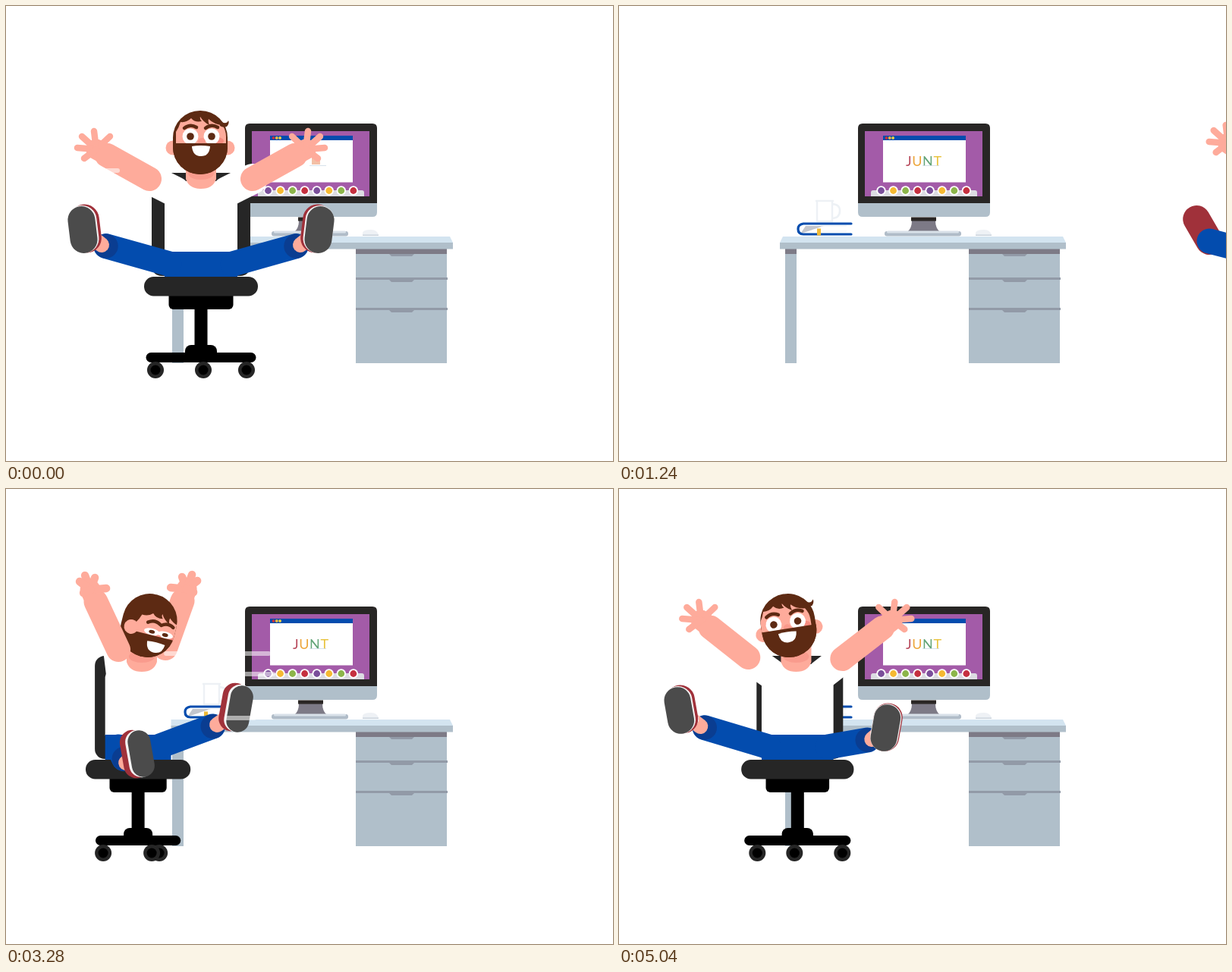
An HTML page for the animation above (5080 ms loop, 800 by 600 pixels).

```html
<!DOCTYPE html>
<html lang="en">
<head>
<meta charset="utf-8">
<title>Office chair spin</title>
<style>
html, body { margin: 0; width: 100%; height: 100%; overflow: hidden; background: #fff; }
svg { display: block; width: 100vw; height: 100vh; }
</style>
</head>
<body>
<svg viewBox="0 0 800 600">
  <g id="desk"></g>
  <g id="man"></g>
</svg>
<script>
const LOOP = 5080, STEP = 40, SPEED = 0.5425, SPIN = 0.45;
const SKIN = '#feab9b', HAIR = '#5d2a13', BLUE = '#034cae', NAVY = '#0a3d91', RED = '#a0313a',
  DARK = '#262626', STEEL = '#b0bfca', GREY = '#7d7a86', EDGE = '#929aa7';
const deskEl = document.getElementById('desk'), manEl = document.getElementById('man');

// ---- shape helpers ----
const rect = (x, y, w, h, fill, r = 0) =>
  `<rect x="${x}" y="${y}" width="${Math.max(0, w)}" height="${h}" rx="${r}" fill="${fill}"/>`;
const dot = (x, y, r, fill) => `<circle cx="${x}" cy="${y}" r="${r}" fill="${fill}"/>`;
const oval = (x, y, rx, ry, fill) => `<ellipse cx="${x}" cy="${y}" rx="${rx}" ry="${ry}" fill="${fill}"/>`;
const path = (d, fill, more = '') => `<path d="${d}" fill="${fill}" ${more}/>`;
const bar = (a, b, w, color, more = '') =>
  `<path d="M${a[0]} ${a[1]}L${b[0]} ${b[1]}" stroke="${color}" stroke-width="${w}" stroke-linecap="round" ${more}/>`;
const mix = (a, b, k) => a + (b - a) * k;
const mixPt = (a, b, k) => [mix(a[0], b[0], k), mix(a[1], b[1], k)];
const clamp = v => Math.min(1, Math.max(0, v));

// ---- pose curves: seven values for headings -54..54 degrees, 18 apart ----
const wrap = a => ((a + 180) % 360 + 360) % 360 - 180;
function front(v, a) {
  const p = Math.min(6, Math.max(0, a / 18 + 3)), i = Math.min(5, Math.floor(p));
  return mix(v[i], v[i + 1], p - i);
}
// a point that turns with the body: half a turn mirrors it
function swing(v, a) {
  a = wrap(a);
  const m = Math.abs(a), s = Math.sign(a);
  if (m <= 54) return front(v, a);
  if (m >= 126) return -front(v, wrap(a - 180));
  return mix(front(v, 54 * s), -front(v, -54 * s), (m - 54) / 72);
}
// a value that settles to one level behind
function settle(v, back, a) {
  a = wrap(a);
  return mix(front(v, a), back, clamp((Math.abs(a) - 54) / 72));
}

const FOOT_X = [134, 150, 156, 156, 116, 11, -4], FOOT_Y = [290, 296, 292, 295, 315, 319, 349];
const ANK_X = [-30, -27, -28, -25, -18, 7, 20], ANK_Y = [21, 18, 21, 20, 15, 14, 12];
const HIP_X = [26, 30, 38, 42, 40, 24, 26];
const SOLE_W = [31, 30, 36, 37, 36, 27, 31], SOLE_A = [10, 9, 10, 7, 10, 2, 10], SHOE = [-9, -9, -4, -4, 1, 3, 9];
const HAND_X = [64, 97, 127, 138, 125, 103, 63], HAND_Y = [132, 151, 173, 189, 173, 146, 133];
const CAP_X = [36, 42, 65, 68, 59, 49, 26], CAP_Y = [210, 216, 222, 228, 224, 213, 212];
const SHOULDER = [26, 30, 33, 34, 32, 30, 22];
const BACK_X = [-34, -36, 54, 65, 60, 73, 57], WHEEL = [28, 35, 53, 60, 59, 48, 46], MID = [18, 15, 4, 3, -4, -15, -18];
const EAR = [20, 28, 35, 36, 35, 26, 22];
const OPEN = [[-18, -17], [3, -24], [19, -17], [25, -2], [16, 12]];
const CURL = [[-21, -2], [-6, -16], [7, -19], [14, -11], [9, 4]];

function drawDesk(textOn) {
  let s = rect(219, 320, 15, 151, STEEL) + rect(219, 320, 15, 7, GREY) +
    rect(461, 320, 120, 151, STEEL) + rect(461, 320, 120, 7, GREY);
  for (const y of [358, 398]) s += rect(461, y, 121, 3, EDGE);
  for (const y of [327, 361, 401]) s += path(`M505 ${y}h33l-3 3h-27z`, EDGE);
  s += path('M216 304H585L589 312H212Z', '#d3e4f0') + rect(212, 312, 377, 8.5, STEEL);
  // monitor
  s += path('M315 259H489V272Q489 278 483 278H321Q315 278 315 272Z', STEEL) +
    path('M315 260V161Q315 155 321 155H483Q489 155 489 161V260Z', '#282625') +
    rect(324, 165, 155, 86, '#a35ba8') + rect(348, 171, 109, 61.5, '#fff') + rect(348, 171, 109, 6, BLUE);
  ['#c5303f', '#f5b942', '#f0d040'].forEach((c, i) => s += dot(352.5 + i * 4.3, 174, 1.9, c));
  s += path('M332 251V246Q332 243 335 243H469Q472 243 472 246V251Z', '#dcdce2');
  const icons = ['#7a4f9a', '#f5b932', '#8cb54a', '#c5303f'];
  for (let i = 0; i < 8; i++) {
    const x = 345.5 + i * 16.05;
    s += dot(x, 243.5, 6.2, '#fff') + dot(x, 243.5, 4.4, icons[i % 4]);
  }
  if (textOn) {
    const ink = ['#b84a5c', '#eda63a', '#62a477', '#e8c23c'];
    s += '<text x="378" y="210.5" font-family="Lato, sans-serif" font-size="18" letter-spacing="0.6">' +
      [...'JUNT'].map((c, i) => `<tspan fill="${ink[i]}">${c}</tspan>`).join('') + '</text>';
  } else s += rect(403, 199, 11, 10, '#f3c0a6');
  s += rect(400, 210, 22, 0.8, '#cfdbe6');
  s += path('M386 283H417Q417 293 423 298H380Q386 293 386 283Z', GREY) + rect(385, 278.5, 33, 5, '#2a2624') +
    rect(350, 297, 101, 6.5, '#b0bcc8', 3) + rect(353, 296.5, 95, 3, '#d9e1e9', 1.5) +
    path('M470 303V299Q471 295 481 295Q490 295 491 303Z', '#eef1f5') + rect(470, 301.5, 21, 1.5, '#cbd4dd');
  // mug and book
  s += path('M259 257H283M261 257V284H281V257M280 261Q291 261 291 270Q291 280 280 280', 'none',
    'stroke="#edf1f5" stroke-width="2.5"');
  s += path('M240 299L246 290H270L243 299Z', '#c3c6cd') + path('M266 290H300M268 297H300', 'none', 'stroke="#eceff3"') +
    path('M306 287H243Q236 288 236 294Q236 301 243 301H306', 'none', `stroke="${BLUE}" stroke-width="3.2" stroke-linecap="round"`) +
    rect(261, 293.5, 5, 9, '#efba37');
  deskEl.innerHTML = s;
}

function chair(cx, a, sq) {
  const seat = 75 - 9 * sq, box = 42.5 - 7.5 * sq, base = 72.5 - 25 * sq, hub = 21 - 3 * sq;
  const turn = Math.abs(wrap(a)) > 90 ? wrap(a - 180) : wrap(a);
  let s = rect(cx - 8.5, 395, 17, 60, '#000') + rect(cx - box, 376, 2 * box, 24, '#000', 6) +
    rect(cx - hub, 447, 2 * hub, 18, '#000', 8) + rect(cx - base, 457, 2 * base, 13, '#000', 6.5);
  for (const w of [-front(WHEEL, -turn), front(WHEEL, turn), front(MID, turn)])
    s += dot(cx + w, 480, 11, DARK) + dot(cx + w, 480, 6.5, '#000');
  return s + rect(cx - seat, 357, 2 * seat, 25.5, DARK, 12.5);
}

function chairBack(cx, a) {
  const p = swing(BACK_X, a), q = -swing(BACK_X, -a), w = Math.max(26, Math.abs(p - q));
  const x = p + q > 0 ? Math.max(p, q) - w : Math.min(p, q);
  return rect(cx + x, 220, w, 136, DARK, 13);
}

// side is 1 or -1; the second limb is the mirror image of the first
function leg(cx, a, side) {
  const b = a * side, X = v => side * swing(v, b), behind = Math.abs(wrap(a)) > 110;
  const foot = [cx + X(FOOT_X) * (behind ? 1.08 : 1), settle(FOOT_Y, 281, b)];
  const ankle = [foot[0] + X(ANK_X) * (behind ? .6 : 1), foot[1] + settle(ANK_Y, 29, b)];
  const hip = [cx + X(HIP_X), 340];
  const cuff = mixPt(ankle, hip, 6 / (1 + Math.hypot(hip[0] - ankle[0], hip[1] - ankle[1])));
  if (behind) return bar(foot, ankle, 36, RED) + bar(ankle, hip, 33, BLUE);
  const w = settle(SOLE_W, 22, b), off = side * settle(SHOE, 9 * Math.sign(wrap(b)), b);
  const pad = (x, y, pw, h, c) => rect(x - pw / 2, y - h / 2, pw, h, c, pw / 2);
  return bar(cuff, hip, 33, BLUE) + dot(cuff[0], cuff[1], 16, NAVY) +
    bar(ankle, mixPt(ankle, foot, .5), 20, SKIN) + bar(mixPt(ankle, foot, .45), foot, 21, '#fff') +
    `<g transform="translate(${foot}) rotate(${side * settle(SOLE_A, 10, b)})">` +
    pad(off, -1, w + 2, 64, RED) + pad(off * .25, -.5, w + 1, 63, '#f4f4f4') + pad(0, 0, w - 1, 62, '#4b4b4b') + '</g>';
}

function armPose(cx, a, side) {
  const b = a * side, X = v => side * swing(v, b);
  return {
    hand: [cx + X(HAND_X), settle(HAND_Y, 181, b)], cap: [cx + X(CAP_X), settle(CAP_Y, 222, b)],
    root: [cx + X(SHOULDER), 245], curl: settle([1, 1, 0, 0, 0, 1, 1], 0, b)
  };
}
const sleeve = p => bar(p.cap, p.root, 40, '#fff');
function arm(p) {
  const dir = p.hand[0] < p.cap[0] ? -1 : 1;
  let s = bar(p.cap, mixPt(p.cap, p.hand, .8), 32, SKIN) + bar(p.cap, p.hand, 27, SKIN);
  OPEN.forEach((o, i) => {
    const t = mixPt(o, CURL[i], p.curl);
    s += bar(p.hand, [p.hand[0] + dir * t[0], p.hand[1] + t[1]], 8.5 + p.curl * 2, SKIN);
  });
  return s;
}

function head(cx, a) {
  const n = wrap(a), sg = Math.sign(n), behind = Math.abs(n) > 108;
  const hx = cx + settle([14, 17, 12, -1, -12, -17, -14], 25 * Math.sin(n * Math.PI / 180), n);
  const tilt = settle([14, 14, 9, 0, -9, -14, -14], 0, n);
  const f = settle([15, 14, 3, 1, -3, -14, -15], -75 * sg, n), nod = settle([15, 14, 4, 0, 4, 14, 15], 8, n);
  const gap = settle([9, 12, 16, 14, 16, 12, 9], 6, n), open = settle([.42, 1, 1, 1, 1, 1, .42], .5, n);
  const ear = side => dot(side * swing(EAR, n * side), 187, 9.5, SKIN);
  const near = n > 0 ? 1 : -1, turned = Math.abs(n) > 25 && Math.abs(n) < 140;
  const shape = `x="-36" y="138" width="72" height="${behind ? 78 : 84}" rx="35.5"`;
  let s = `<g transform="translate(${hx} 0) rotate(${tilt} 0 180)"><clipPath id="skull"><rect ${shape}/></clipPath>`;
  s += ear(-near) + (turned ? '' : ear(near)) + `<rect ${shape} fill="${HAIR}"/>`;
  if (!behind) {
    s += `<g clip-path="url(#skull)"><g transform="translate(${f} ${nod})">` +
      path('M-33 182V166Q-29 160-27 153Q-19 154-13 148Q-8 154 1 152Q-2 149-1 146Q3 153 11 157Q9 152 10 149Q17 156 28 157Q33 164 33 172V183Z', SKIN) +
      oval(gap + 7, 178, 9, 5, '#f58c80');
    for (const e of [-gap, gap]) {
      const look = open < .8 ? [4, 2.4] : [4.8, 4.8];
      s += oval(e, 172, 10.5, 10.5 * open, '#fff') + oval(e, 172, ...look, HAIR) +
        path(`M${e - 8} 161Q${e} 155 ${e + 8} 160`, 'none', `stroke="${HAIR}" stroke-width="4.5" stroke-linecap="round"`);
    }
    s += oval(1, 179, 5, 5, '#fa9a8c') + '</g>' + path(`M-37 ${181 + nod * .7}H37V224H-37Z`, HAIR) +
      `<g transform="translate(${f} ${nod})">` +
      path('M-12 185Q0 183 12 185Q11 198 0 198Q-11 198-12 185Z', '#fff') + '</g></g>';
    if (Math.abs(n) < 25) s += path('M24 150Q34 158 37 151Q39 154 35 159Q30 161 26 158Z', HAIR);
  }
  if (turned) s += ear(near);
  return s + '</g>';
}

function trails(cx, d, sq) {
  const s = Math.min(1, Math.sqrt(sq) / .809), grow = s ** 3;
  const line = (from, to, y) => bar([cx + d * from, y], [cx + d * to, y], 6, '#fff', 'opacity=".55"');
  let out = line(mix(-124, -172, grow), mix(-110, -37, grow), 217);
  if (s > .8) out += line(-178, -142, 244) + line(-153, -117, 302);
  return out;
}

function drawMan(u, d) {
  const cx = d > 0 ? 257 + SPEED * u : 543 - SPEED * u;
  const a = wrap(-SPIN * u * d), rad = a * Math.PI / 180, sq = Math.sin(rad) ** 2;
  const near = a >= 0 ? 1 : -1, half = 48 - 7 * sq, nx = cx - 6 * Math.sin(rad);
  const farArm = armPose(cx, a, -near), nearArm = armPose(cx, a, near);
  const legs = leg(cx, a, -near) + leg(cx, a, near);
  const shirt = sleeve(farArm) + sleeve(nearArm) +
    path(`M${cx - half} 325V248Q${cx - half + 3} 234 ${cx - 26} 231H${cx + 26}Q${cx + half - 3} 234 ${cx + half} 248V325Z`, '#fff') +
    rect(cx - half, 324, 2 * half, 33, BLUE);
  const neck = path(`M${nx - 20} 205H${nx + 20}V228Q${nx + 16} 241 ${nx} 241Q${nx - 16} 241 ${nx - 20} 228Z`, SKIN) +
    oval(nx, 221, 17, 8, '#f99b8d');
  const face = head(cx, a);
  const body = Math.cos(rad) >= 0
    ? chair(cx, a, sq) + chairBack(cx, a) + shirt + neck + arm(farArm) + face + arm(nearArm) + legs
    : legs + arm(farArm) + arm(nearArm) + shirt + neck + face + chairBack(cx, a) + chair(cx, a, sq);
  return body + trails(cx, d, sq);
}

function draw(t) {
  let s = '';
  if (t < 1320) s = drawMan(t, 1);
  else if (t >= 4280) s = drawMan(t - LOOP, 1);
  else if (t >= 1800 && t < 3920) s = drawMan(t - 2600, -1);
  manEl.innerHTML = s;
  drawDesk(t > 0);
}

let start = null, last = -1;
function tick(now) {
  if (start === null) start = now;
  const t = Math.floor(((now - start) % LOOP) / STEP) * STEP;
  if (t !== last) draw(last = t);
  requestAnimationFrame(tick);
}
draw(0);
requestAnimationFrame(tick);
</script>
</body>
</html>
```
